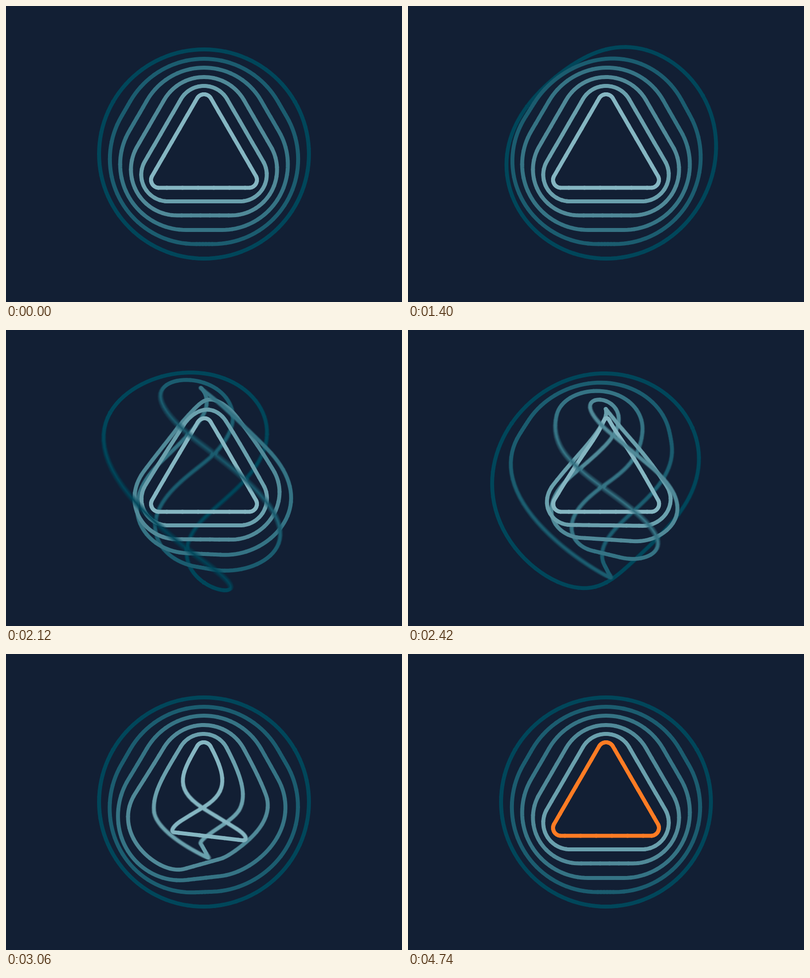
Recreate the animation shown at these times as an HTML page with a canvas. Size 800 by 600 pixels, loop 5.78 s.

```html
<!DOCTYPE html>
<html lang="en">
<head>
<meta charset="utf-8">
<title>Twisting rings</title>
<style>
  html, body { margin: 0; width: 100%; height: 100%; overflow: hidden; background: #121f34; }
  canvas { display: block; width: 800px; height: 600px; }
</style>
</head>
<body>
<canvas id="stage" width="800" height="600"></canvas>
<script>
const LOOP = 5780, STEP = 20;
const CAMERA = 300 / Math.tan(Math.PI / 6);
const TWIST = 2037;      // time one point takes to turn half way round
const SPREAD = 0.136;    // how far the twist lags from the middle to the bottom
const MID_TIME = 1976, STAGGER = 207.5;
const SAMPLES = 6, SHUTTER = 12;
const CHUNK = 4;
const BACK = '#121f34';
const DARK = [0, 70, 90], LIGHT = [133, 182, 194], ORANGE = [255, 124, 36];
const CORNER_RADII = [212, 172, 133, 93, 54, 16];

const clamp = v => Math.min(1, Math.max(0, v));
const ease = p => p < 0.5 ? 4 * p ** 3 : 1 - 4 * (1 - p) ** 3;
const smooth = p => p * p * (3 - 2 * p);
const mix = (a, b, k) => a.map((v, i) => v + (b[i] - v) * k);
const rgb = c => `rgb(${c.map(Math.round).join(',')})`;

// Closed outline of a rounded triangle, also cut up along its straight sides.
function roundedTriangle(reach, radius) {
  const corners = [];
  for (let j = 0; j < 3; j++) {
    const axis = (-90 + 120 * j) * Math.PI / 180;
    const arc = [];
    for (let i = 0; i <= 40; i++) {
      const a = axis + (i / 40 - 0.5) * 2 * Math.PI / 3;
      arc.push([reach * Math.cos(axis) + radius * Math.cos(a),
                reach * Math.sin(axis) + radius * Math.sin(a)]);
    }
    corners.push(arc);
  }
  const points = [];
  corners.forEach((arc, j) => {
    points.push(...arc);
    const end = arc[40], next = corners[(j + 1) % 3][0];
    for (let i = 1; i < 23; i++) points.push(mix(end, next, i / 23));
  });
  return points;
}

const rings = CORNER_RADII.map((radius, k) => ({
  points: roundedTriangle(21 * k, radius),
  inner: 10.5 * k + radius,
  mid: MID_TIME + STAGGER * k,
  color: mix(DARK, LIGHT, k / 5)
}));

function project([x, y], ring, t) {
  const p = clamp(0.5 + (t - ring.mid) / TWIST - SPREAD * y / ring.inner);
  const angle = Math.PI * ease(p);
  const z = x * Math.sin(angle);
  const scale = CAMERA / (CAMERA - z);
  return [400 + x * Math.cos(angle) * scale, 300 + y * scale, z];
}

const stage = document.getElementById('stage').getContext('2d');
const layer = document.createElement('canvas');
layer.width = 800;
layer.height = 600;
const pen = layer.getContext('2d');
pen.lineWidth = 8;
pen.lineCap = pen.lineJoin = 'round';

function drawMoment(t) {
  const glow = smooth(clamp((t - 4285) / 450));
  const pieces = [];
  rings.forEach((ring, k) => {
    const color = rgb(k === 5 ? mix(ring.color, ORANGE, glow) : ring.color);
    const pts = ring.points.map(point => project(point, ring, t));
    for (let i = 0; i < pts.length; i += CHUNK) {
      const line = [];
      for (let j = i; j <= Math.min(i + CHUNK, pts.length); j++) line.push(pts[j % pts.length]);
      const depth = line.reduce((sum, q) => sum + q[2], 0) / line.length;
      pieces.push({ line, depth, color });
    }
  });
  pieces.sort((a, b) => a.depth - b.depth);

  pen.fillStyle = BACK;
  pen.fillRect(0, 0, 800, 600);
  for (const { line, color } of pieces) {
    pen.strokeStyle = color;
    pen.beginPath();
    line.forEach(([x, y]) => pen.lineTo(x, y));
    pen.stroke();
  }
}

// Averages several moments for motion blur.
function drawFrame(t) {
  for (let i = 0; i < SAMPLES; i++) {
    drawMoment(t + SHUTTER * ((i + 0.5) / SAMPLES - 0.5));
    stage.globalAlpha = 1 / (i + 1);
    stage.drawImage(layer, 0, 0);
  }
}

const start = performance.now();
let shown = -1;
function tick() {
  const t = Math.floor((performance.now() - start) % LOOP / STEP) * STEP;
  if (t !== shown) drawFrame(shown = t);
  requestAnimationFrame(tick);
}
tick();
</script>
</body>
</html>
```
